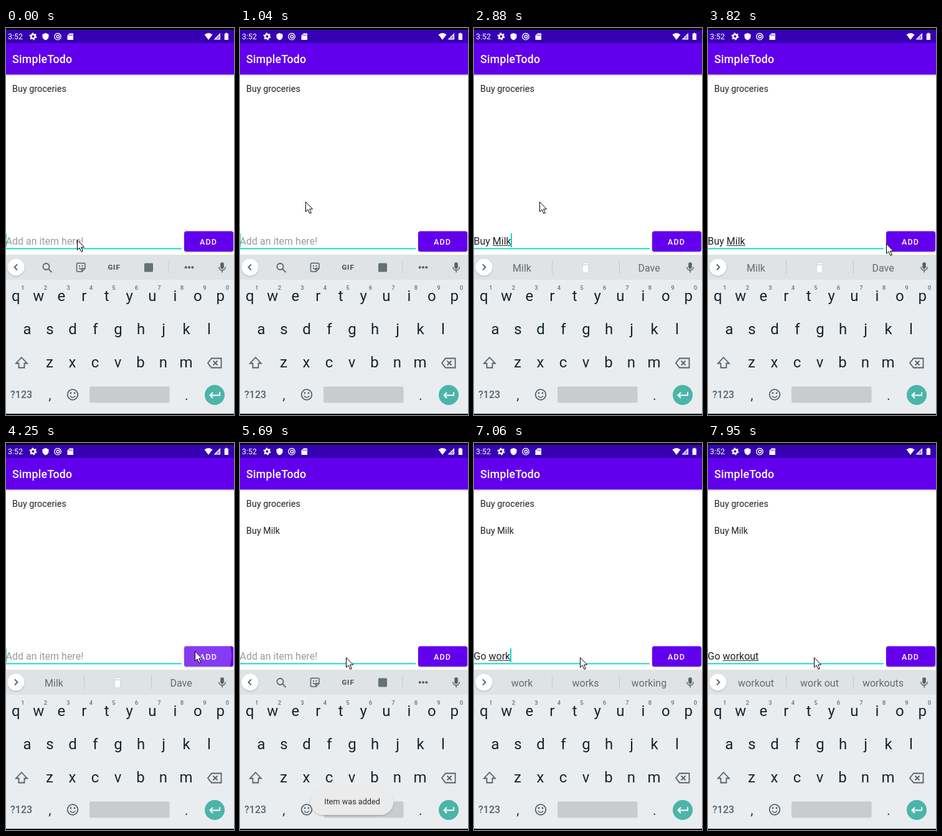
Write an HTML page that moves like this. It is 366 px wide and 618 px high and loops after 8 s.

```html
<!DOCTYPE html>
<html lang="en">
<head>
<meta charset="utf-8">
<title>Todo list</title>
<style>
html, body { margin: 0; width: 100%; height: 100%; overflow: hidden; background: #fff; }
svg { display: block; width: 366px; height: 618px; }
text { font-family: Roboto, sans-serif; white-space: pre; }
.mid { text-anchor: middle; }
.line { fill: none; stroke: #566067; stroke-width: 1.8; }
</style>
</head>
<body>
<svg viewBox="0 0 366 618" xmlns="http://www.w3.org/2000/svg">
  <defs>
    <filter id="soft" x="-20%" y="-30%" width="140%" height="170%">
      <feDropShadow dx="0" dy="1" stdDeviation="1" flood-opacity=".28"/>
    </filter>
    <clipPath id="btn"><rect x="286" y="324.5" width="79" height="32.5" rx="3.5"/></clipPath>
  </defs>

  <rect width="366" height="618" fill="#fff"/>
  <rect y="24" width="366" height="50.3" fill="#6200ee" filter="url(#soft)"/>
  <rect width="366" height="3" fill="#000"/>
  <rect y="3" width="366" height="21" fill="#3700b3"/>

  <g fill="#fff">
    <text x="3" y="18" font-size="12.5">3:52</text>
    <circle cx="43.5" cy="13.5" r="3.2" fill="none" stroke="#fff" stroke-width="2.6"/>
    <circle cx="43.5" cy="13.5" r="5" fill="none" stroke="#fff" stroke-width="2" stroke-dasharray="2.4 2.836"/>
    <path d="M63.5 8l5 2v3.6c0 3-2 5-5 6c-3-1-5-3-5-6V10z"/>
    <circle cx="83" cy="13.7" r="5.2" fill="none" stroke="#fff" stroke-width="1.4"/>
    <circle cx="83.4" cy="13.7" r="2.2" fill="none" stroke="#fff" stroke-width="1.5"/>
    <path d="M102 8.5h6v10.500h-9.500v-7z"/>
    <path d="M101.700 10.500v2.200M104 10.500v2.200M106.200 10.500v2.200" stroke="#3700b3"/>
    <path d="M318.500 10.500q6.500-5 13 0L325 19z"/>
    <path d="M344 8v10.500h-10.500z"/>
    <path d="M342.800 11v6.300h-6.300z" fill="#3700b3" opacity=".45"/>
    <path d="M352.300 7.800h3v1.200h1.700v10h-6.300V9h1.600z"/>
    <text x="10" y="56" font-size="17.8" font-weight="500" letter-spacing=".22">SimpleTodo</text>
  </g>

  <g fill="#222" font-size="14.4">
    <text x="10" y="101.500">Buy groceries</text>
    <text id="item" x="10" y="144.500">Buy Milk</text>
  </g>

  <text id="hint" x="-.5" y="345.500" font-size="16" fill="#9b9b9b">Add an item here!</text>
  <text id="typed" x="-.5" y="345.500" font-size="16" fill="#222"></text>
  <rect id="under" y="347" height="1" fill="#333"/>
  <rect y="351.500" width="282" height="1.800" fill="#03dac5"/>
  <rect id="caret" y="328" width="2" height="22" fill="#03dac5"/>

  <rect x="286" y="324.500" width="79" height="32.500" rx="3.500" fill="#6200ee" filter="url(#soft)"/>
  <circle id="ripple" cx="303" cy="339" fill="#fff" clip-path="url(#btn)"/>
  <text x="311" y="345.500" font-size="12.500" font-weight="500" letter-spacing="1.110" fill="#fff">ADD</text>

  <rect y="362" width="366" height="254" fill="#e9edf0"/>
  <rect y="362" width="366" height="40" fill="#dfe3e5"/>
  <circle cx="16" cy="382" r="13.500" fill="#fff" filter="url(#soft)"/>
  <path id="chevron" class="line" stroke-width="2"/>

  <g id="tools">
    <circle class="line" cx="64.500" cy="381" r="5"/>
    <path class="line" d="M68 384.700l5.500 5.500"/>
    <path class="line" style="stroke-width:1.500" d="M115 375.500h10.500q1.500 0 1.500 1.500v7l-5 5h-7q-1.500 0-1.500-1.500V377q0-1.500 1.500-1.500zM127 384h-3.500q-1.500 0-1.500 1.500V389M117 383q3 3.500 6 0"/>
    <path d="M117 379h2v2h-2zM121.500 379h2v2h-2z" fill="#566067"/>
    <text class="mid" x="173.500" y="386.300" font-size="11.500" font-weight="900" letter-spacing=".8" fill="#566067">GIF</text>
    <rect x="222" y="375.500" width="14" height="14" rx="1.500" fill="#667077"/>
    <path d="M261 372.500v19" stroke="#c6cbce"/>
    <g fill="#566067"><circle cx="288.700" cy="382.300" r="2"/><circle cx="294" cy="382.300" r="2"/><circle cx="299.300" cy="382.300" r="2"/></g>
  </g>
  <g id="words">
    <path d="M125.500 371v22M233.500 371v22" stroke="#c3c8cb"/>
    <g id="slots" class="mid" font-size="16"></g>
    <g id="glass">
      <path d="M174 374.500h10l-1 16.500h-8z" fill="#f3f5f6" stroke="#cdd3d7" stroke-width=".8"/>
      <path d="M174.800 379h8.400l-.7 11h-7z" fill="#fff"/>
      <path d="M174.500 378.300h9" stroke="#c9c5c0" stroke-width=".8"/>
    </g>
  </g>
  <rect x="344.200" y="374.300" width="5.600" height="10.200" rx="2.800" fill="#566067"/>
  <path class="line" style="stroke-width:1.500" d="M341.800 381.500c0 7 10.400 7 10.400 0M347 386.800v3.700"/>

  <g id="keys" class="mid" fill="#17252b" font-size="24"></g>
  <g id="digits" class="mid" fill="#677178" font-size="9.500" font-weight="500"></g>
  <path class="line" d="M25 526l9 9.500h-4.500v7h-9v-7H16z"/>
  <path class="line" d="M330 527.500h15.500v15H330l-6-7.500zM332.500 531.500l7 7M339.500 531.500l-7 7"/>
  <text x="7" y="591.300" font-size="16" font-weight="500" fill="#56636a">?123</text>
  <g class="mid" font-size="22" fill="#2c393f"><text x="70.500" y="593">,</text><text x="290" y="594">.</text></g>
  <circle class="line" cx="107" cy="585.500" r="8.300"/>
  <path class="line" style="stroke-width:1.500" d="M102.800 587.500q4.200 5 8.400 0"/>
  <circle cx="104" cy="583" r="1.400" fill="#566067"/><circle cx="110" cy="583" r="1.400" fill="#566067"/>
  <rect x="134" y="572.500" width="128.500" height="26" rx="2.500" fill="#c8ccce"/>
  <circle cx="335" cy="586" r="16" fill="#4bb5a9"/>
  <path d="M343 581.500v5h-15M332 582l-4.500 4.500l4.500 4.500" fill="none" stroke="#fff" stroke-width="2"/>

  <g id="toast">
    <rect x="113" y="552" width="133.500" height="42" rx="21" fill="#ebebeb" filter="url(#soft)"/>
    <text x="135.300" y="577" font-size="12.650" fill="#2b2b2b">Item was added</text>
  </g>
  <rect y="616" width="366" height="2" fill="#000"/>
  <path id="mouse" d="M.5.7v15.600l3.500-3.300l2.900 6.300l2.500-1.100l-2.800-6.100h4.900z" fill="#fff" stroke="#000" stroke-linejoin="round"/>
</svg>
<script>
const LOOP = 8000;
const $ = id => document.getElementById(id);
const NS = 'http://www.w3.org/2000/svg';

// time, settled text, word being typed, suggestions
const typing = [
  [0, '', '', ''],
  [1560, '', 'B', 'B,Be,Being'],
  [1710, '', 'Bu', 'Bu,But,Buy'],
  [1830, '', 'Buy', 'Buy,But,Buying'],
  [2110, 'Buy ', '', 'a,the,it'],
  [2390, 'Buy ', 'M', 'M,My,Me'],
  [2510, 'Buy ', 'Mi', 'Mi,Mix,Mini'],
  [2630, 'Buy ', 'Mil', 'Mil,Milk,Mile'],
  [2880, 'Buy ', 'Milk', 'Milk,*,Dave'],
  [4250, '', '', 'Milk,*,Dave'],
  [4370, '', '', ''],
  [5810, '', 'G', 'G,Go,Great'],
  [5930, '', 'Go', 'Go,Good,Got'],
  [6180, 'Go ', '', 'to,and,for'],
  [6320, 'Go ', 'w', 'w,we,with'],
  [6440, 'Go ', 'wo', 'wo,!to,work'],
  [6560, 'Go ', 'wor', 'wor,work,working'],
  [7060, 'Go ', 'work', 'work,works,working'],
  [7180, 'Go ', 'worko', 'worko,work,workout'],
  [7300, 'Go ', 'workou', 'workou,workout,workouts'],
  [7570, 'Go ', 'workout', 'workout,work out,workouts']
];
const mouse = [
  [0, 114, 338], [650, 112, 245], [770, 108, 152], [920, 107, 222], [1040, 105, 277],
  [3550, 152, 285], [3680, 230, 302], [3820, 286, 344], [3950, 312, 338],
  [4100, 319, 338], [4250, 303, 332], [4520, 235, 337], [4640, 170, 342]
];
const caret = [[0, 1], [370, 0], [920, 1], [1440, 0], [1560, 1], [3410, 0], [3950, 1],
  [4790, 0], [5190, 1], [5690, 0], [5810, 1], [7950, 0]];
const toast = [[0, 0], [4370, .35], [4520, .8], [4640, 1], [6320, .85], [6440, .65], [6560, .3], [6680, 0]];
const ripple = [[0, 0, 0], [4250, 59, .23], [4370, 80, .2], [4520, 80, .08], [4640, 0, 0]];

const at = (list, t) => list.findLast(row => row[0] <= t);
const show = (id, on) => { $(id).style.display = on ? '' : 'none'; };
function set(el, attrs) { for (const k in attrs) el.setAttribute(k, attrs[k]); }
function label(parent, x, y, str) {
  const el = document.createElementNS(NS, 'text');
  set(el, { x, y });
  el.textContent = str;
  return $(parent).appendChild(el);
}

const pen = document.createElement('canvas').getContext('2d');
pen.font = '16px Roboto, sans-serif';
const width = str => pen.measureText(str).width;

[['qwertyuiop', 15.8, 435.800], ['asdfghjkl', 34, 488.500], ['zxcvbnm', 70, 541.500]].forEach(([row, x, y]) =>
  [...row].forEach((ch, i) => label('keys', x + i * 36.5, y, ch)));
[...'1234567890'].forEach((d, i) => label('digits', 27 + i * 36.5, 418, d));
const slots = [77, 179, 281].map(x => label('slots', x, 388.5, ''));

function draw(t) {
  const [, done, word, hints] = at(typing, t);
  const text = done + word;
  $('typed').textContent = text;
  show('hint', !text);
  set($('under'), { x: Math.max(0, width(done) - .5), width: width(word) });
  set($('caret'), { x: Math.round(width(text)) - 1 });
  show('caret', at(caret, t)[1]);

  show('tools', !hints);
  show('words', hints);
  set($('chevron'), { d: hints ? 'M14 377.500l4.500 4.500l-4.500 4.500' : 'M18 377.500l-4.500 4.500l4.500 4.500' });
  const list = hints.split(',');
  slots.forEach((el, i) => {
    const s = list[i] || '', bold = s[0] === '!';
    el.textContent = s.replace(/[!*]/, '');
    set(el, { fill: bold ? '#111' : '#626b70', 'font-weight': bold ? 700 : 400 });
  });
  show('glass', list[1] === '*');

  show('item', t >= 4370);
  const [, r, glow] = at(ripple, t);
  set($('ripple'), { r, opacity: glow });
  set($('toast'), { opacity: at(toast, t)[1] });
  const [, x, y] = at(mouse, t);
  set($('mouse'), { transform: `translate(${x} ${y})` });
}

const start = performance.now();
function frame() {
  draw((performance.now() - start) % LOOP);
  requestAnimationFrame(frame);
}
frame();
</script>
</body>
</html>
```
